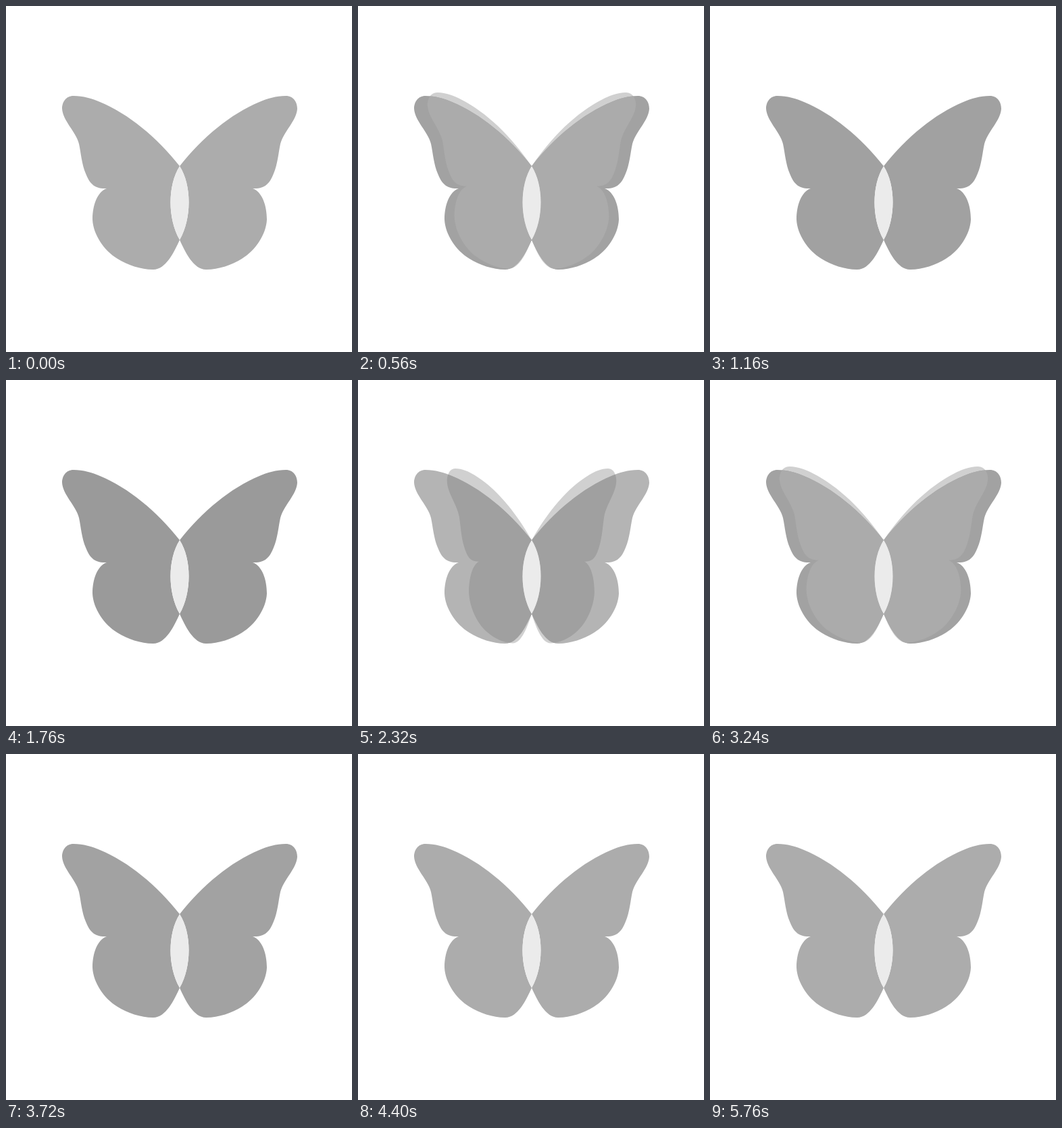
An HTML page with a canvas that plays this animation: 512 by 512 pixels, repeating every 5.8 s.

```html
<!DOCTYPE html>
<html>
<head>
<meta charset="utf-8">
<style>
  html, body { margin: 0; width: 100%; height: 100%; overflow: hidden; background: #fff; }
  canvas { display: block; width: 100vw; height: 100vh; }
</style>
</head>
<body>
<canvas id="stage" width="512" height="512"></canvas>
<script>
const ctx = document.getElementById('stage').getContext('2d');
const LOOP = 5800, STEP = 40, BEAT = 840, REST = 4200, AXIS = 257;

// Left wing; x is measured from the body axis.
const wing = new Path2D(`M0 237 C-34 194 -75 160 -118 142 C-129 137 -143 133 -157 133
  C-169 133 -174 143 -174 152 C-173 170 -154 185 -149 204 C-146 218 -145 234 -139 248
  C-133 263 -126 271 -108 270 C-122 275 -129 295 -129 316 C-128 338 -112 362 -92 374
  C-78 383 -57 390 -40 390 C-21 391 -8 364 0 346 C-18 315 -18 265 0 237Z`);
const lens = new Path2D('M0 237 C-18 265 -18 315 0 346 C18 315 18 265 0 237Z');

// Grey of the open wings through one beat: [time, level]
const tones = [[0, 172], [80, 154], [480, 166], [840, 172]];

const mix = (a, b, k) => a + (b - a) * k;
const grey = v => `rgb(${v},${v},${v})`;

function toneAt(t) {
  const i = tones.findIndex(k => k[0] > t);
  const [t0, v0] = tones[i - 1], [t1, v1] = tones[i];
  return mix(v0, v1, (t - t0) / (t1 - t0));
}

function foldAt(t) {
  const d = Math.abs(t - 640) / 160;
  return d < 1 ? ((1 + Math.cos(Math.PI * d)) / 2) ** 1.3 : 0;
}

function fillFolded(fold, color) {
  const lift = 0.11 * fold * (1 - fold) + 0.013 * fold;
  ctx.save();
  ctx.transform(1 - 0.28 * fold, lift, 0, 1, 0, 0);
  ctx.fillStyle = color;
  ctx.fill(wing);
  ctx.restore();
}

function drawSide(side, fold, tone) {
  ctx.save();
  ctx.scale(side, 1);
  if (fold) fillFolded(fold, grey(208));
  ctx.fillStyle = grey(fold ? mix(150, 180, fold) : tone);
  ctx.fill(wing);
  if (fold) {
    ctx.clip(wing);
    fillFolded(fold, grey(mix(178, 160, fold)));
  }
  ctx.restore();
}

function draw(now) {
  const t = Math.floor(now % LOOP / STEP) * STEP;
  const beat = t < REST ? t % BEAT : 0;
  const fold = foldAt(beat), tone = toneAt(beat);
  ctx.setTransform(1, 0, 0, 1, 0, 0);
  ctx.fillStyle = '#fff';
  ctx.fillRect(0, 0, 512, 512);
  ctx.translate(AXIS, 0);
  drawSide(1, fold, tone);
  drawSide(-1, fold, tone);
  ctx.fillStyle = grey(235);
  ctx.fill(lens);
}

const start = performance.now();
function tick() {
  draw(performance.now() - start);
  requestAnimationFrame(tick);
}
tick();
</script>
</body>
</html>
```
